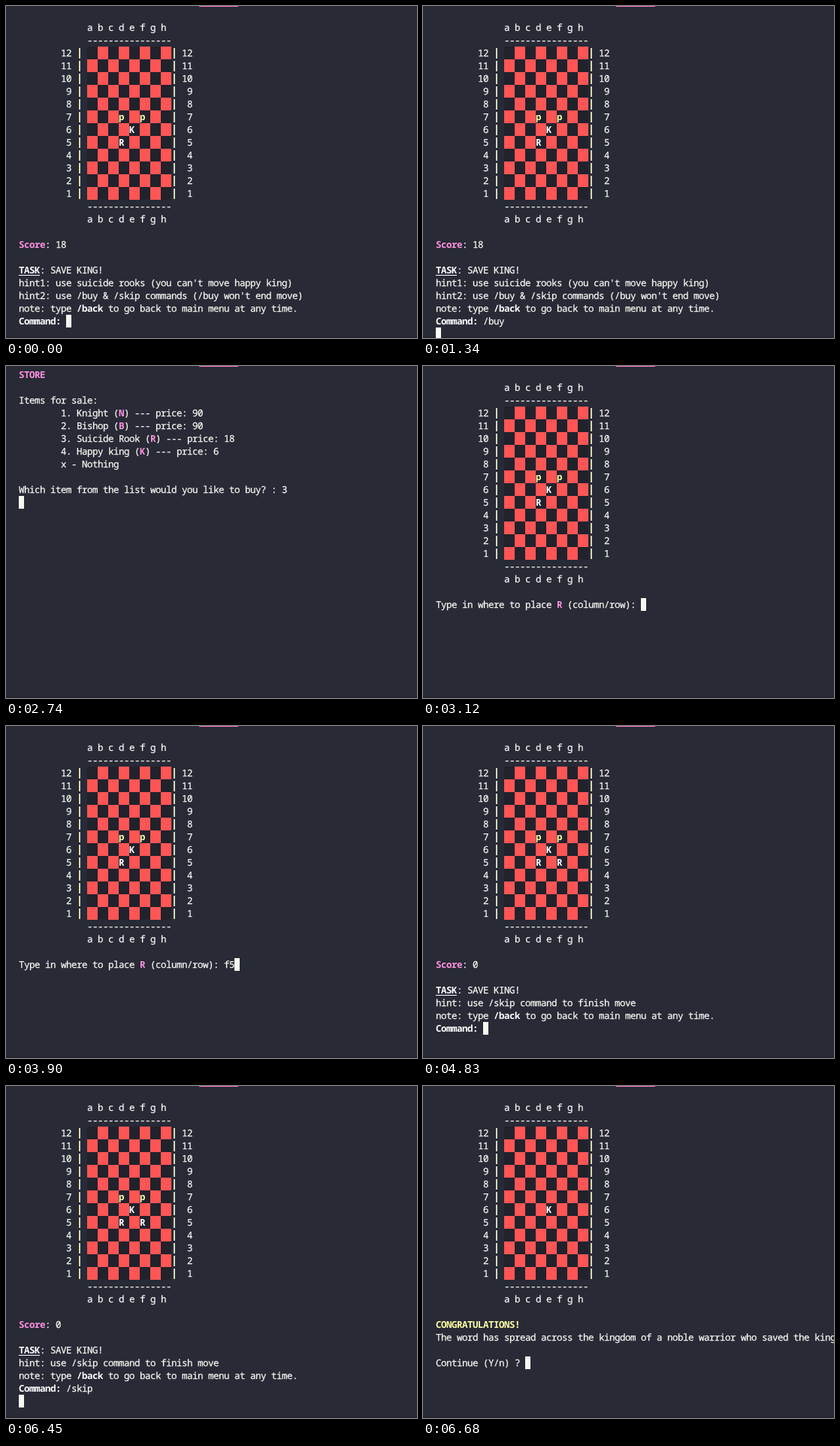
Write an HTML page that moves like this. It is 547x442 px and loops after 7.84 s.

```html
<!DOCTYPE html>
<html lang="en">
<head>
<meta charset="utf-8">
<title>Save the king</title>
<style>
  html, body { margin: 0; width: 100%; height: 100%; overflow: hidden; background: #282a36; }
  #stage {
    position: relative; width: 547px; height: 442px; overflow: hidden;
    background: #282a36; color: #f8f8f2;
    font: 500 12.5px/17px "Noto Sans Mono", "DejaVu Sans Mono", monospace;
    letter-spacing: calc(7px - 1ch);
    text-rendering: geometricPrecision;
    font-variant-ligatures: none;
  }
  #stage div { position: absolute; }
  .line { height: 17px; white-space: pre; -webkit-text-stroke: 0.25px; }
  .line b { color: #fff; -webkit-text-stroke: 0; }
  .line b.pink { color: #ff92df; }
  .line b.gold { color: #ffffa5; }
  .line .bar {
    display: inline-block; height: 17px; color: transparent;
    background: linear-gradient(90deg, #f8d67c 50%, #b4dcec 0) 3px 2px / 2px 14px no-repeat;
  }
  .line u { text-decoration-thickness: 1px; text-underline-offset: 2px; }
  #tab { left: 257px; top: 0; width: 52px; height: 1px; background: #ff79c6; }
  #edge { left: 0; top: 440px; width: 547px; height: 2px; background: #242530; }
  #board {
    left: 108px; top: 54px; width: 112px; height: 204px;
    background: conic-gradient(#f55 25%, #21222c 0 50%, #f55 0 75%, #21222c 0) 0 0 / 28px 34px;
  }
  #cursor { width: 7px; height: 17px; background: #f8f8f2; }
</style>
</head>
<body>
<div id="stage">
  <div id="tab"></div>
  <div id="edge"></div>
  <div id="board"></div>
  <div id="text"></div>
  <div id="cursor"></div>
</div>
<script>
const LOOP = 7840, LEFT = 17, TOP = 3, CW = 7, CH = 17;
const $ = id => document.getElementById(id);
const pink = s => `<b class="pink">${s}</b>`;
const gold = s => `<b class="gold">${s}</b>`;
const bar = '<span class="bar">|</span>';

// Text cells: [row, column, markup]
function boardText(pieces) {
  const out = [];
  for (const r of [1, 16]) out.push([r, 13, 'a b c d e f g h']);
  for (const r of [2, 15]) out.push([r, 13, '-'.repeat(16)]);
  for (let n = 12; n > 0; n--) {
    const label = String(n).padStart(2), row = 15 - n;
    out.push([row, 8, `${label} ${bar}`], [row, 29, `${bar} ${label}`]);
  }
  for (const [kind, file, rank] of pieces) {
    const col = 13 + 2 * 'abcdefgh'.indexOf(file);
    out.push([15 - rank, col, kind === 'p' ? gold(kind) : `<b>${kind}</b>`]);
  }
  return out;
}

const king = [['K', 'e', 6]];
const siege = [['p', 'd', 7], ['p', 'f', 7], ...king, ['R', 'd', 5]];
const rescue = [...siege, ['R', 'f', 5]];

function taskText(score, hints) {
  const rows = ['<b><u>TASK</u></b>: SAVE KING!', ...hints,
    'note: type <b>/back</b> to go back to main menu at any time.'];
  return [[18, 0, `${pink('Score')}: ${score}`], ...rows.map((s, i) => [20 + i, 0, s])];
}

const goods = [['Knight', 'N', 90], ['Bishop', 'B', 90], ['Suicide Rook', 'R', 18], ['Happy king', 'K', 6]];

const screens = {
  task: {
    board: true, row: 24, prompt: '<b>Command:</b> ',
    cells: [...boardText(siege), ...taskText(18, [
      "hint1: use suicide rooks (you can't move happy king)",
      "hint2: use /buy &amp; /skip commands (/buy won't end move)"])]
  },
  store: {
    row: 9, prompt: 'Which item from the list would you like to buy? : ',
    cells: [[0, 0, pink('STORE')], [2, 0, 'Items for sale:'],
      ...goods.map(([name, key, price], i) =>
        [3 + i, 8, `${i + 1}. ${name} (${pink(key)}) --- price: ${price}`]),
      [7, 8, 'x - Nothing']]
  },
  place: {
    board: true, row: 18, prompt: `Type in where to place ${pink('R')} (column/row): `,
    cells: boardText(siege)
  },
  skip: {
    board: true, row: 23, prompt: '<b>Command:</b> ',
    cells: [...boardText(rescue), ...taskText(0, ['hint: use /skip command to finish move'])]
  },
  won: {
    board: true, row: 21, prompt: 'Continue (Y/n) ? ',
    cells: [...boardText(king), [18, 0, gold('CONGRATULATIONS!')],
      [19, 0, 'The word has spread across the kingdom of a noble warrior who saved the king']]
  }
};

// [start, screen, typed]; a trailing newline means Enter was pressed
const steps = [
  [0, 'task', ''], [550, 'task', '/'], [850, 'task', '/b'], [1020, 'task', '/bu'],
  [1170, 'task', '/buy'], [1340, 'task', '/buy\n'],
  [1640, 'store', ''], [2420, 'store', '3'], [2740, 'store', '3\n'],
  [3120, 'place', ''], [3350, 'place', 'f'], [3900, 'place', 'f5'], [4520, 'place', 'f5\n'],
  [4830, 'skip', ''], [5210, 'skip', '/'], [5530, 'skip', '/s'], [5610, 'skip', '/sk'],
  [5690, 'skip', '/ski'], [5920, 'skip', '/skip'], [6450, 'skip', '/skip\n'],
  [6680, 'won', '']
];

const place = (row, col) => `left:${LEFT + col * CW}px;top:${TOP + row * CH}px`;
const line = ([row, col, html]) => `<div class="line" style="${place(row, col)}">${html}</div>`;

function draw([, name, typed]) {
  const s = screens[name], entered = typed.endsWith('\n');
  const width = s.prompt.replace(/<[^>]*>/g, '').length + typed.length;
  $('board').style.display = s.board ? 'block' : 'none';
  $('text').style.cssText = 'left:0;top:0';
  $('text').innerHTML = [...s.cells, [s.row, 0, s.prompt + typed.trim()]].map(line).join('');
  $('cursor').style.cssText = entered ? place(s.row + 1, 0) : place(s.row, width);
}

const start = performance.now();
let shown = null;
function tick() {
  const t = (performance.now() - start) % LOOP;
  const step = steps.findLast(s => s[0] <= t) || steps[0];
  if (step !== shown) draw(shown = step);
  requestAnimationFrame(tick);
}
tick();
</script>
</body>
</html>
```
